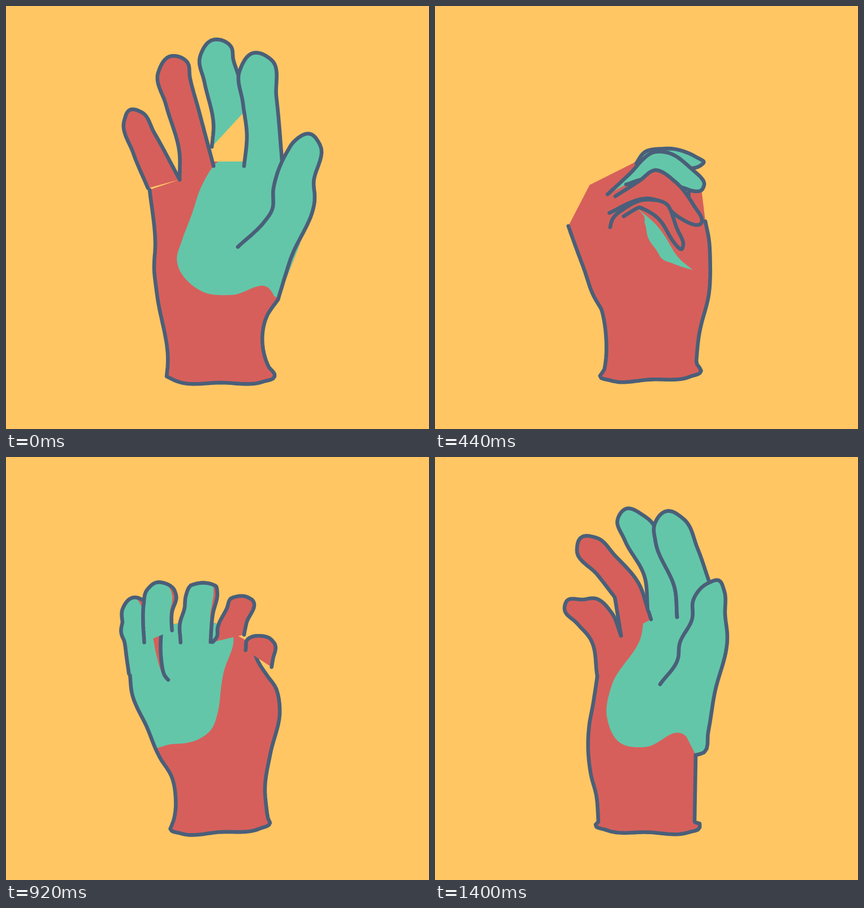
These frames come from a looping animation (748 by 748 pixels, 1440 ms). An HTML page:

```html
<!DOCTYPE html>
<html lang="en">
<head>
<meta charset="utf-8">
<title>Turning hand</title>
<style>
html, body { margin: 0; width: 100%; height: 100%; overflow: hidden; background: #ffc663; }
svg { display: block; width: 100vw; height: 100vh; }
.line { fill: none; stroke: #4a5f79; stroke-width: 6.6; stroke-linecap: round; stroke-linejoin: round; }
</style>
</head>
<body>
<svg viewBox="0 0 748 748"></svg>
<script>
const LOOP = 1440, STEP = 40, N = 40;
const RED = '#d65f5b', GREEN = '#63c6a9';
const FILL = { palm: RED, pinky: RED, ring: RED, middle: GREEN, index: GREEN, thumb: GREEN };

// Fingers: left side / right side, the rounded tip is computed.
// Palm: left side / right side / unlined top, the cuff is computed.
// "!" marks a corner. "shade" is the red share of a finger, negative on its left.
const poses = [{
  t: 0, slow: true, order: 'palm pinky ring middle index thumb',
  palm: '254,325 264,420 262,465 267,510 286,635 284,655! / 475,655 464,637 461,549 481,519 / 520,420 486,285 421,275 364,275 307,307',
  pinky: '251,322 225,260 209,203 / 240,188 262,224 298,290 307,307',
  ring: '307,307 307,262 283,175 269,118 / 321,100 325,125 341,185 367,283',
  middle: '364,249 367,213 351,135 343,90 / 398,72 402,95 411,123 424,184',
  index: '421,283 426,230 419,172 413,115 / 469,95 478,160 489,285',
  thumb: '410,426 458,380 470,362 473,322 497,258 509,240 / 555,245 544,315 546,336 503,448 481,519',
  green: '367,283 346,318 328,370 311,415 302,448 347,505 400,511 465,499 476,516! 600,480 540,240 440,240'
}, {
  t: 280, slow: true, order: 'palm thumb index middle ring pinky', shade: { index: -.5, middle: -.5 },
  palm: '246,393 262,448 281,497 306,578 304,624 297,646! 291,652 / 474,645 463,632! 474,570 498,505 511,440 517,376 / 510,300 409,275 287,352',
  pinky: '311,409 337,399! 356,428 372,468 / 410,470 405,420 380,352 345,341 287,352 250,378 246,393',
  ring: '300,400 390,420 411,473 / 456,465 449,405 420,336 378,302 340,321 287,352',
  middle: '380,330 430,370 456,428 / 498,408 478,338 430,277 409,270 347,313 295,347',
  index: '430,300 470,340 498,372 / 536,358 523,314 470,270 422,255 409,270',
  thumb: '458,270 454,254 / 519,252 513,282 523,314',
  green: '389,485! 415,503 480,501 498,492 540,470 540,360 430,380'
}, {
  t: 600, order: 'thumb palm index middle ring pinky', shade: { index: .3, middle: .5 },
  palm: '219,383 251,452 270,512 291,533! 295,575 301,645! 293,657 / 465,645 460,637! 459,600 465,510 449,450 434,412 414,388 / 400,300 330,240 251,258',
  pinky: '371,311 398,287 430,280 478,297 495,322 / 485,351 460,347 447,335! 423,348! 414,388',
  ring: '322,310 342,262 373,228 396,219 452,214 475,217 / 497,248 484,261 405,270! 398,287 371,311',
  middle: '269,292 293,233 318,203 375,164 421,150 / 439,170 415,207 373,228 342,262 322,310',
  index: '219,383 242,308 251,258 287,192 337,145 / 372,148 375,164 304,213 269,292',
  thumb: '300,440 300,400 / 340,400 340,440',
  green: '340,215 316,258 307,305 260,377 275,410 296,470 286,525! 230,535 180,400 230,250'
}, {
  t: 760, slow: true, order: 'palm thumb index middle ring pinky', shade: { thumb: .45, index: .2, middle: .2 },
  palm: '196,327 206,385 242,455 268,518 292,552 301,602 294,648 289,659 / 476,648 474,641! 473,550 487,480 495,375 494,354 / 438,290 375,275 313,275 250,310',
  pinky: '438,306 447,258 466,241 / 502,262 497,320 494,354',
  ring: '375,283 387,265 390,235 418,165 427,134 / 469,138 452,220 446,262',
  middle: '314,284 313,222 327,172 331,130 343,97 / 391,100 393,118 380,190 375,283',
  index: '249,318 248,240 251,185 262,132 / 321,118 326,143 313,212 314,284',
  thumb: '198,355 196,327 181,276 / 216,264 236,281 248,306 249,345 255,402',
  green: '364,285 345,345 354,420 359,458 328,505 278,530! 140,520 140,250 300,250'
}, {
  t: 1080, slow: true, order: 'pinky ring middle index palm thumb',
  palm: '249,429 252,445 249,470 265,525 296,595 296,647 293,655 / 452,645 443,632! 434,572 458,487 481,390 468,355 456,341 412,330 363,311 335,283 316,279 / 260,300 240,350',
  pinky: '400,400 400,440 / 430,440 430,400',
  ring: '350,400 350,440 / 380,440 380,400',
  middle: '300,400 300,440 / 340,440 340,400',
  index: '237,344 231,385 230,402 / 250,415 260,344',
  thumb: '249,429 238,370 237,344! 230,320 246,292! 247,258 / 312,258 316,279! 318,292 313,335 331,386 339,381',
  green: '463,362! 464,378 440,458 390,520 330,521 263,488 253,491! 180,480 180,240 480,250 472,345!'
}, {
  t: 1280, order: 'palm ring pinky middle index thumb',
  palm: '313,458 299,525 295,553 306,600 308,639! 301,641 / 466,655 459,645! 454,580 459,521! 477,503 489,450 526,376! 482,230 440,192 411,178 / 395,230 390,280 355,310 345,345 325,380',
  pinky: '352,380 344,387 352,430 348,446 / 311,447 299,400 303,372 327,336 365,341 374,348',
  ring: '361,304 350,323 320,342 298,376 / 262,360 278,328 305,290 333,276 355,269 397,276',
  middle: '397,276 355,269 283,277 / 273,247 295,230 333,213 377,226 384,238 405,244',
  index: '397,212 366,224 338,217 / 336,165 370,170 411,178',
  thumb: '380,388 383,365 397,337 393,325 399,300 397,275 410,235 / 465,235 473,312 460,374 464,387',
  green: '397,276! 397,337 378,359 352,380 340,400 326,455 326,500! 390,482 456,521! 600,520 600,140 400,140'
}, {
  t: 1400, order: 'palm pinky ring middle index thumb',
  palm: '287,388 279,440 273,472 276,563 285,597 289,645! 284,650 / 468,655 468,648! 459,646! 461,527 / 500,400 485,225 428,270 376,270 329,310',
  pinky: '287,388 275,322 252,295 229,268 / 262,252 283,250 312,275 329,316',
  ring: '329,316 318,248! 287,208 251,165 / 286,143 318,174 362,227 375,265 382,287',
  middle: '376,270 371,213 335,146 323,110 / 368,103 387,121 390,150 425,237 428,283',
  index: '428,283 425,237 390,150 388,120 / 440,110 464,161 485,221',
  thumb: '398,402 430,355 432,332 455,285 457,252 485,222 / 511,235 513,280 517,317 494,420 483,487 475,523 461,527',
  green: '376,270 363,322 312,405 304,460 328,506 372,513 437,489 464,523! 600,480 540,240 440,240'
}];

const clamp = v => Math.max(0, Math.min(1, v));
const mix = (a, b, f) => a + (b - a) * f;
const mixPt = (p, q, f) => ({ x: mix(p.x, q.x, f), y: mix(p.y, q.y, f) });
const mixLine = (a, b, f) => a.map((p, i) => mixPt(p, b[i], f));

const read = text => text.trim().split(/\s+/).map(s => {
  const [x, y] = s.split(',').map(parseFloat);
  return { x, y, corner: s.endsWith('!') };
});

function chord(a, b) {
  const x = b.x - a.x, y = b.y - a.y, len = Math.hypot(x, y) || 1;
  return { x: x / len, y: y / len, len };
}

// Smooth curve through the points, as one list of samples per segment.
function trace(pts, closed) {
  const n = pts.length, at = i => pts[(i + n) % n];
  const slope = (i, own) => {
    if (at(i).corner || (!closed && i % (n - 1) === 0)) return own;
    const p = chord(at(i - 1), at(i)), q = chord(at(i), at(i + 1));
    return chord({ x: 0, y: 0 }, { x: p.x * q.len + q.x * p.len, y: p.y * q.len + q.y * p.len });
  };
  return Array.from({ length: closed ? n : n - 1 }, (_, i) => {
    const a = at(i), b = at(i + 1), c = chord(a, b), u = slope(i, c), v = slope((i + 1) % n, c);
    return Array.from({ length: 13 }, (_, k) => {
      const s = k / 12, h = s * s * (3 - 2 * s), p = s * (1 - s) ** 2 * c.len, q = s * s * (s - 1) * c.len;
      return { x: mix(a.x, b.x, h) + u.x * p + v.x * q, y: mix(a.y, b.y, h) + u.y * p + v.y * q };
    });
  });
}

// Evenly spaced points along a polyline.
function spread(line, count) {
  const dist = [0];
  for (let i = 1; i < line.length; i++) dist.push(dist[i - 1] + chord(line[i - 1], line[i]).len * (line[i - 1].x !== line[i].x || line[i - 1].y !== line[i].y));
  let i = 1;
  return Array.from({ length: count }, (_, k) => {
    const d = dist.at(-1) * k / (count - 1);
    while (i < line.length - 1 && dist[i] < d) i++;
    return mixPt(line[i - 1], line[i], clamp((d - dist[i - 1]) / (dist[i] - dist[i - 1] || 1)));
  });
}

function tip(left, right) {
  const a = left.at(-1), b = right[0], mid = mixPt(a, b, .5);
  const u = chord(left.at(-2), a), v = chord(right[1], b);
  const dir = chord({ x: 0, y: 0 }, { x: u.x + v.x, y: u.y + v.y });
  const reach = chord(a, b).len * .375;
  return [{ x: mid.x + dir.x * reach, y: mid.y + dir.y * reach }];
}

function cuff(left, right) {
  return [.1, .5, .9].map(f => {
    const p = mixPt(left.at(-1), right[0], f);
    return { x: p.x, y: p.y + 8 + 3 * Math.sin(f * Math.PI) };
  });
}

function limb(text, bridge) {
  const [left, right, top] = text.split('/').map(read);
  const join = bridge(left, right);
  const segs = trace([...left, ...join, ...right], false);
  const a = left.length - 1, b = a + join.length + 1;
  const parts = [segs.slice(0, a), segs.slice(a, b), segs.slice(b)];
  return {
    line: parts.flatMap(s => spread(s.flat(), N)),
    top: top ? spread(top, N) : []
  };
}

const keys = poses.map(p => {
  const limbs = {};
  for (const name in FILL) {
    limbs[name] = limb(p[name], name === 'palm' ? cuff : tip);
    limbs[name].shade = p.shade?.[name] || 0;
  }
  return { t: p.t, slow: p.slow, order: p.order.split(' '), limbs, green: spread(trace(read(p.green), true).flat(), 4 * N) };
});
keys.push({ ...keys[0], t: LOOP });

// Red strip along one side of a finger, fading out towards its base.
function strip(line, shade) {
  const end = line.length - 1, half = Math.floor(end / 2);
  const side = shade > 0 ? [...line].reverse() : line, other = shade > 0 ? line : [...line].reverse();
  const rim = side.slice(0, half + 1);
  const inner = rim.map((p, k) => mixPt(p, other[k], Math.abs(shade) * Math.min(1, 2 * k / half)));
  return [...rim, ...inner.reverse()];
}

// The thumb swings outwards just after each fully open pose.
const bump = (t, centre) => clamp(1 - Math.abs(t - centre) / 80);
const swing = t => 32 * bump(t, 80) - 40 * bump(t, 840);

const path = pts => 'M' + pts.map(p => p.x.toFixed(1) + ' ' + p.y.toFixed(1)).join('L');
const shape = (pts, fill, more = '') => `<path d="${path(pts)}Z" fill="${fill}"${more}/>`;

function drawLimb(name, a, b, f, t) {
  const p = a.limbs[name], q = b.limbs[name];
  let line = mixLine(p.line, q.line, f);
  if (name === 'thumb')
    line = line.map((pt, k) => ({ x: pt.x + swing(t) * Math.sin(Math.PI * k / (line.length - 1)), y: pt.y }));
  const body = [...line, ...mixLine(p.top, q.top, f)], shade = mix(p.shade, q.shade, f);
  let out = shape(body, FILL[name]);
  if (name === 'palm') {
    out += `<clipPath id="inside">${shape(body, RED)}</clipPath>`;
    out += shape(mixLine(a.green, b.green, f), GREEN, ' clip-path="url(#inside)"');
  } else if (Math.abs(shade) > .01) out += shape(strip(line, shade), RED);
  return out + `<path class="line" d="${path(line)}"/>`;
}

const svg = document.querySelector('svg');
let shown = -1;

function draw(now) {
  const t = Math.floor((now % LOOP) / STEP) * STEP;
  if (t === shown) return;
  shown = t;
  const i = keys.findIndex((k, j) => t >= k.t && t < keys[j + 1].t);
  const a = keys[i], b = keys[i + 1];
  const f = ((t - a.t) / (b.t - a.t)) ** (a.slow ? 1.4 : 1);
  svg.innerHTML = (f < .5 ? a : b).order.map(name => drawLimb(name, a, b, f, t)).join('');
}

function tick(now) {
  draw(now);
  requestAnimationFrame(tick);
}
draw(0);
requestAnimationFrame(tick);
</script>
</body>
</html>
```
